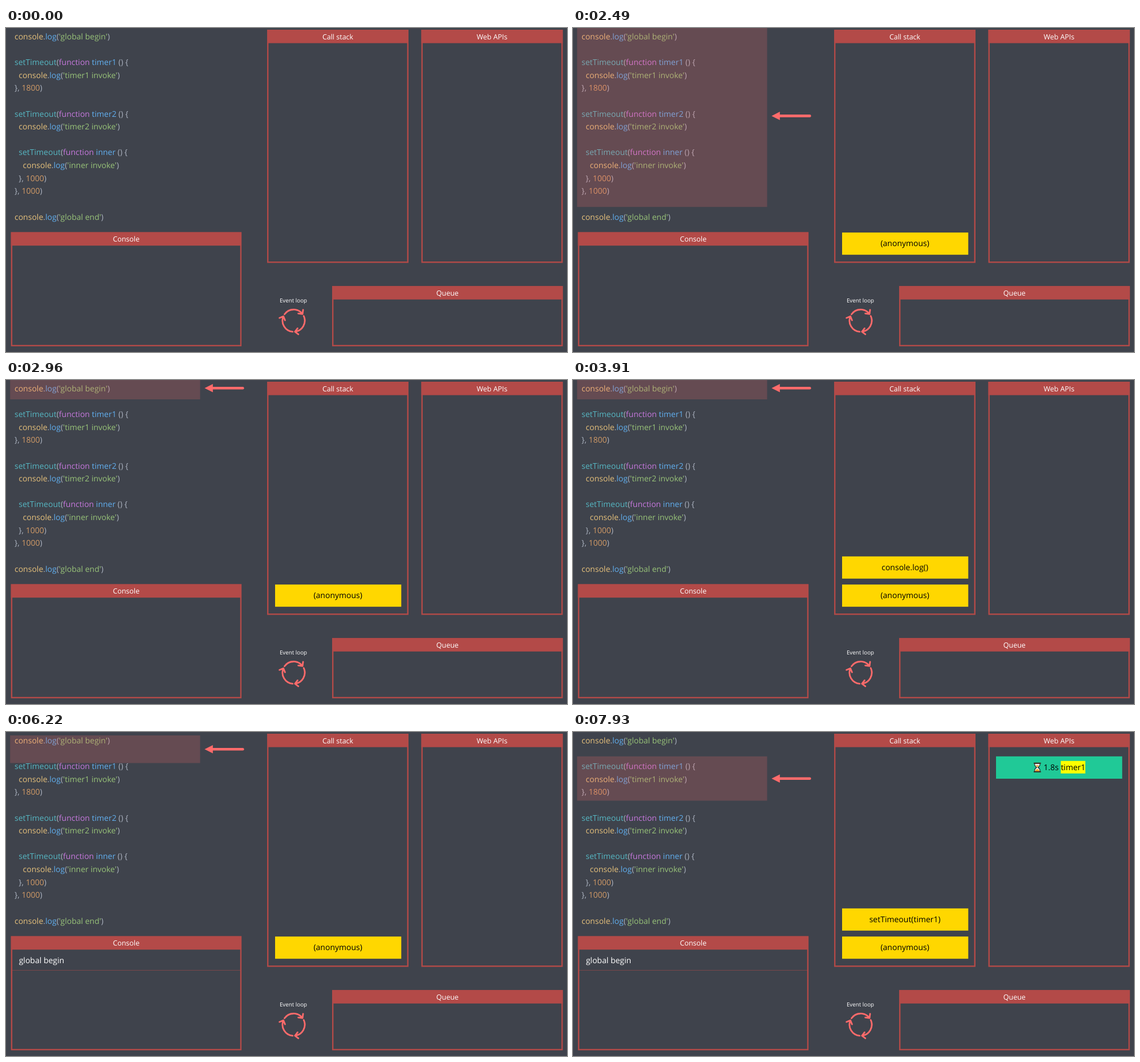
An HTML page for the animation above (8 s loop, 984 px wide and 569 px high).

```html
<!DOCTYPE html>
<html lang="en">
<head>
<meta charset="utf-8">
<title>Event loop</title>
<style>
  html, body { margin: 0; width: 100%; height: 100%; overflow: hidden; background: #3f434c; }
  svg { display: block; width: 100%; height: 100%; }
  text { font: 14px "Open Sans", "Noto Sans", sans-serif; white-space: pre; text-rendering: geometricPrecision; }
  .mid { text-anchor: middle; }
  .head { font-size: 12.5px; fill: #fff; }
  .small { font-size: 9.8px; fill: #fff; }
</style>
</head>
<body>
<svg id="stage" viewBox="0 0 984 569"></svg>
<script>
const LOOP = 8000, FADE = 344, MOVE = 535;
const RED = '#b34a48', CORAL = '#ff6b6b', GOLD = '#ffd700';
const stage = document.getElementById('stage');

function add(parent, tag, attrs, text) {
  const el = document.createElementNS('http://www.w3.org/2000/svg', tag);
  for (const key in attrs) el.setAttribute(key, attrs[key]);
  if (text !== undefined) el.textContent = text;
  parent.appendChild(el);
  return el;
}

const box = (parent, x, y, width, height, fill) => add(parent, 'rect', { x, y, width, height, fill });
const label = (parent, x, y, text, cls, fill = '#000') => add(parent, 'text', { x, y, class: cls, fill }, text);

// Code listing
const CODE = `console.log('global begin')

setTimeout(function timer1 () {
  console.log('timer1 invoke')
}, 1800)

setTimeout(function timer2 () {
  console.log('timer2 invoke')

  setTimeout(function inner () {
    console.log('inner invoke')
  }, 1000)
}, 1000)

console.log('global end')`;
const TOKEN = /(console)|(setTimeout)|(function)|(log|timer\d|inner)|('[^']*')|(\d+)|([.,(){}\s]+)/g;
const INK = ['#e5c07b', '#56b6c2', '#c678dd', '#61afef', '#98c379', '#d19a66', '#abb2bf'];

CODE.split('\n').forEach((line, row) => {
  if (!line) return;
  const text = add(stage, 'text', { x: 15, y: 19.6 + row * 22.65 });
  for (const m of line.matchAll(TOKEN)) {
    const kind = m.slice(1).findIndex(s => s !== undefined);
    add(text, 'tspan', { fill: INK[kind] }, m[0]);
  }
});

// Panels
function panel(x, y, w, h, title) {
  add(stage, 'rect', {
    x: x + 1.2, y: y + 1.2, width: w - 2.4, height: h - 2.4,
    fill: 'none', stroke: RED, 'stroke-width': 2.4
  });
  box(stage, x, y, w, 23.6, RED);
  label(stage, x + w / 2, y + 16.5, title, 'mid head', '#fff');
}
panel(458, 3, 248, 409.5, 'Call stack');
panel(728.5, 3, 248, 409.5, 'Web APIs');
panel(8.7, 358.6, 404.4, 200.4, 'Console');
panel(572, 453.2, 404.6, 105.8, 'Queue');

// Event loop icon
label(stage, 504, 481.6, 'Event loop', 'mid small', '#fff');
for (let k = 0; k < 3; k++) {
  add(stage, 'path', {
    d: 'M-16 -11.2A19.5 19.5 0 0 1 15.6 -11.7M8.2 -12.7L15.6 -11.7L16.6 -19.1',
    transform: `translate(504.5 514) rotate(${k * 120})`,
    fill: 'none', stroke: CORAL, 'stroke-width': 2.8,
    'stroke-linecap': 'round', 'stroke-linejoin': 'round'
  });
}

// Pointer: highlighted lines and arrow
const pointer = add(stage, 'g');
const shade = add(pointer, 'rect', { x: 7.2, width: 333.3, fill: CORAL, opacity: 0.2 });
const arrow = add(pointer, 'g');
add(arrow, 'path', { d: 'M360 0H415.3', stroke: CORAL, 'stroke-width': 4.6, 'stroke-linecap': 'round' });
add(arrow, 'path', { d: 'M348.3 0L362.8 -7.3V7.3Z', fill: CORAL });

// Cards
function card(y, text) {
  const g = add(stage, 'g');
  box(g, 472, y, 221.3, 39, GOLD);
  label(g, 582.2, y + 24.2, text, 'mid');
  return g;
}
const anon = card(359.2, '(anonymous)');
const logCall = card(309.8, 'console.log()');
const timeoutCall = card(309.8, 'setTimeout(timer1)');

const output = add(stage, 'g');
label(output, 22.7, 405.6, 'global begin', '', '#fff');
add(output, 'rect', { x: 9, y: 418, width: 404, height: 1, fill: RED, opacity: 0.5 });

const timer = add(stage, 'g');
box(timer, 742, 42.8, 221.3, 39.2, '#20c997');
box(timer, 855.6, 50.8, 43, 22, '#ff0');
label(timer, 825.6, 67.2, '1.8s timer1');
const glass = add(timer, 'g', { transform: 'translate(814.4 62.3)' });
add(glass, 'path', {
  d: 'M-4.6 -7V-4.5Q-4.6 -2.6 -1.2 0Q-4.6 2.6 -4.6 4.5V7H4.6V4.5Q4.6 2.6 1.2 0Q4.6 -2.6 4.6 -4.5V-7Z',
  fill: '#e9f1f2', stroke: '#222', 'stroke-width': 1.1
});
add(glass, 'path', { d: 'M-3.2 -3.8H3.2L0 -0.6ZM-3.8 6.4Q-3 3.4 0 2.8Q3 3.4 3.8 6.4Z', fill: '#f5a623' });
box(glass, -6.3, -8.5, 12.6, 2, '#3a2a20');
box(glass, -6.3, 6.5, 12.6, 2, '#3a2a20');

// Linear progress sampled in n steps; the first visible step lasts `hold`
function ramp(t, from, to, n, span, hold = (to - from) / (n - 1)) {
  if (t < from) return 0;
  if (t >= to) return 1;
  let at = from;
  if (t >= from + hold) {
    const gap = (to - from - hold) / (n - 2);
    at += hold + Math.floor((t - from - hold) / gap + 1e-6) * gap;
  }
  return 1 - (to - at) / span;
}

const mix = (a, b, p) => a + (b - a) * p;
const show = (el, alpha) => el.setAttribute('opacity', alpha);

function draw(t) {
  const shrink = ramp(t, 2490, 2960, 7, MOVE, 100);
  const next = ramp(t, 6070, 6560, 7, MOVE);
  const top = mix(-5.4, 42.8, next);
  const bottom = mix(mix(353, 34, shrink), 120.6, next);
  shade.setAttribute('y', top);
  shade.setAttribute('height', bottom - top);
  arrow.setAttribute('transform', `translate(0 ${(top + bottom) / 2})`);

  show(pointer, ramp(t, 470, 710, 4, FADE));
  show(anon, ramp(t, 1550, 1790, 4, FADE));
  show(logCall, t < 5340 ? ramp(t, 3590, 3910, 5, FADE) : t < 5420 ? 0.33 : 0);
  show(output, ramp(t, 4560, 4770, 4, FADE));
  show(timeoutCall, ramp(t, 7020, 7250, 4, FADE, 50));
  show(timer, ramp(t, 7700, 7930, 4, FADE));
}

const start = performance.now();
function tick() {
  draw((performance.now() - start) % LOOP);
  requestAnimationFrame(tick);
}
draw(0);
requestAnimationFrame(tick);
</script>
</body>
</html>
```
